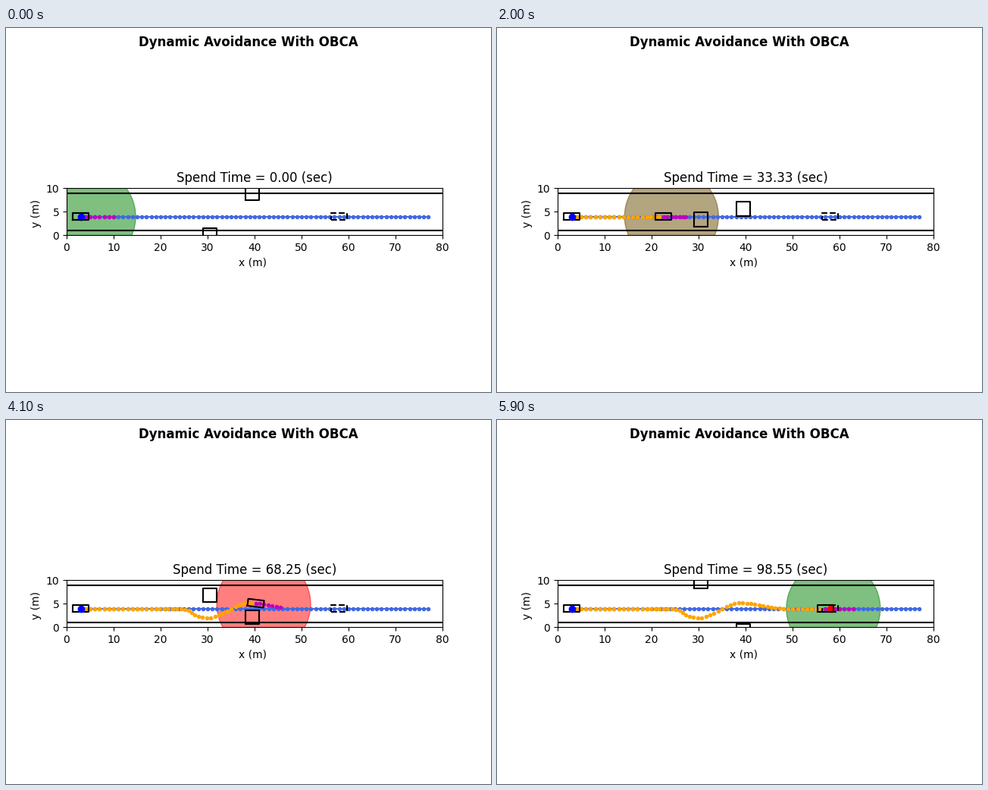
Write a matplotlib script that moves like this. It is 640x480 px and loops after 6000 ms.

```python
import numpy as np
import matplotlib.pyplot as plt
from matplotlib.animation import FuncAnimation

FRAMES, INTERVAL = 60, 100
HORIZON = 7
LENGTH, WIDTH = 3.4, 1.5
LANE_Y, GOAL_X = 4.0, 58.0
OBSTACLE_SIZE = 3.0
SENSE_RADIUS = 10.0


def ease(s, start, end):
    """Cosine ramp from 0 to 1 between two steps."""
    return (1 - np.cos(np.pi * np.clip((s - start) / (end - start), 0, 1))) / 2


# One state per step; the extra steps feed the last predictions.
steps = np.arange(FRAMES + HORIZON)
path_x = np.interp(steps, [0, 16, 23, 27, 50, 69],
                   [3, 19, 25.2, 28.05, 48.1, 66.85])
# Dip below the first obstacle, rise over the second, settle in the lane.
path_y = (LANE_Y - 1.98 * ease(steps, 21.7, 28.9)
          + 3.18 * ease(steps, 29.1, 39.4) - 1.2 * ease(steps, 39.4, 50))
heading = np.arctan2(np.diff(path_y), np.diff(path_x))

# The solver takes a little longer per step at both ends.
clock = np.interp(steps, [0, 14, 47, 59], [0, 23.36, 78.22, 98.55])


def box(x, y, length, width, angle=0.0):
    """Closed outline of a rotated rectangle centred on (x, y)."""
    u = np.array([-1, 1, 1, -1, -1]) * length / 2
    v = np.array([-1, -1, 1, 1, -1]) * width / 2
    c, s = np.cos(angle), np.sin(angle)
    return x + c * u - s * v, y + s * u + c * v


def obstacles(t):
    """Centres of the two crossing obstacles."""
    return [(30.5, 0.1 * t), (39.5, 9 - 0.1 * t)]


def danger(x, y, t):
    nearest = min(np.hypot(ox - x, oy - y) for ox, oy in obstacles(t))
    return float(np.clip((10.7 - nearest) / 6.67, 0, 1))


def prediction(i):
    """Planned states; the swerve enters the plan gradually."""
    first = max(i, 1)
    ahead = slice(first, first + HORIZON)
    weight = np.clip((i - 20) / 3, 0, 1)
    return path_x[ahead], LANE_Y + weight * (path_y[ahead] - LANE_Y)


fig, ax = plt.subplots(figsize=(6.4, 4.8), dpi=100)
fig.suptitle("Dynamic Avoidance With OBCA", fontweight="bold")
ax.set_aspect("equal")
ax.set_xlim(0, 80)
ax.set_ylim(0, 10)
ax.set_xlabel("x (m) ")
ax.set_ylabel("y (m) ")
title = ax.set_title("")

sensor = plt.Circle((0, 0), SENSE_RADIUS, alpha=0.5)
ax.add_patch(sensor)

for edge in (1, 9):
    ax.plot([0, 80], [edge, edge], "k-")
lane = np.arange(3, 78)
ax.plot(lane, np.full(len(lane), LANE_Y), ".-", color="royalblue")
trail, = ax.plot([], [], ".", color="orange")
plan, = ax.plot([], [], "m.")
ax.plot(*box(3, LANE_Y, LENGTH, WIDTH), "k-")
ax.plot(*box(GOAL_X, LANE_Y, LENGTH, WIDTH), "k--")
ax.plot(3, LANE_Y, "bo")
goal, = ax.plot(GOAL_X, LANE_Y, "ro")
vehicle, = ax.plot([], [], "k-")
blocks = [ax.plot([], [], "k-")[0] for _ in range(2)]


def update(i):
    t, x, y, angle = clock[i], path_x[i], path_y[i], heading[i]
    title.set_text(f"Spend Time = {t:.2f} (sec)")

    level = danger(x, y, t)
    sensor.set_center((x + LENGTH / 2 * np.cos(angle),
                       y + LENGTH / 2 * np.sin(angle)))
    sensor.set_color((level, 0.5 * (1 - level), 0))

    trail.set_data(path_x[:i], path_y[:i])
    plan.set_data(*prediction(i))
    vehicle.set_data(*box(x, y, LENGTH, WIDTH, angle))
    for block, (ox, oy) in zip(blocks, obstacles(t)):
        block.set_data(*box(ox, oy, OBSTACLE_SIZE, OBSTACLE_SIZE))
    goal.set_visible(i == FRAMES - 1)


anim = FuncAnimation(fig, update, frames=FRAMES, interval=INTERVAL,
                     init_func=lambda: None, repeat=True, repeat_delay=0)
plt.show()
```
